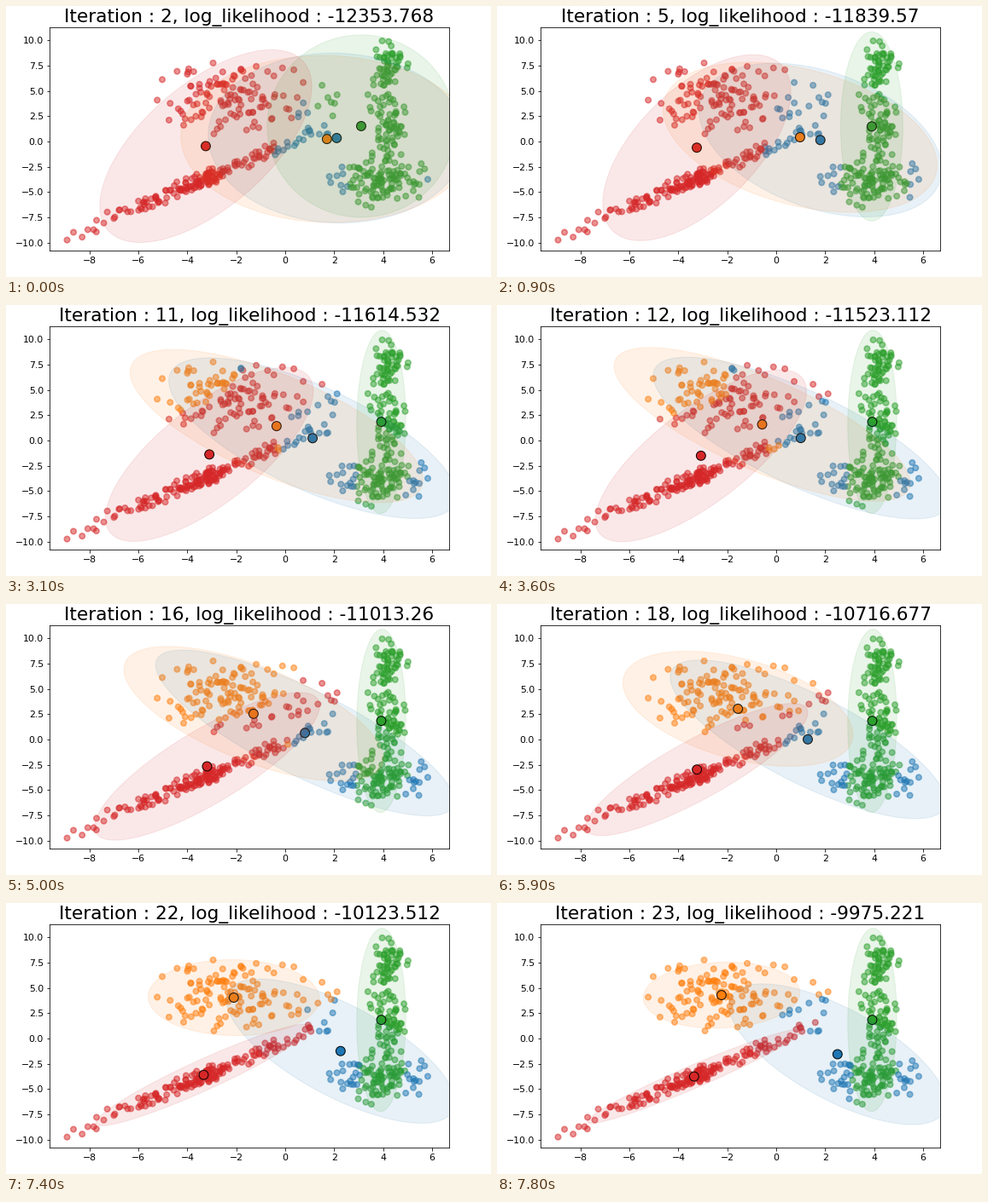
These frames come from a looping animation (568 px wide and 318 px high, 8000 ms). A matplotlib script:

```python
import numpy as np
import matplotlib.pyplot as plt
from matplotlib.animation import FuncAnimation
from matplotlib.patches import Polygon

WIDTH, HEIGHT, DPI = 568, 318, 72
LEFT, BOTTOM, AX_WIDTH, AX_HEIGHT = 51, 31, 468, 262
TICK_MS, TICKS = 100, 80
SCALE = 1.083  # text and markers relative to the default point sizes
COLORS = np.array(["tab:blue", "tab:orange", "tab:green", "tab:red"])

# Iteration 10 is skipped; some iterations open with one empty tick.
ITERATIONS = [*range(2, 10), *range(11, 24)]
BLANK_BEFORE = {5, 12, 19, 20, 23}
STARTS = np.rint(np.interp(ITERATIONS, [2, 3, 5, 9, 15, 16, 18, 20, 23],
                           [0, 1, 8.4, 23.4, 47, 50, 58.6, 66.2, 77.4]))

# Key poses by iteration: centre x, centre y, half width, half height, correlation.
BLUE = {2: (2.1, .35, 5.25, 8.4, -.03), 5: (1.8, .15, 4.96, 7.6, -.38),
        12: (1.0, .25, 6.03, 8.0, -.77), 16: (.8, .65, 6.1, 8.2, -.82),
        23: (2.5, -1.55, 4.43, 6.96, -.69)}
ORANGE = {2: (1.7, .25, 5.97, 8.26, -.03), 5: (.97, .43, 5.6, 7.42, -.37),
          12: (-.58, 1.6, 6.05, 7.6, -.76), 16: (-1.3, 2.55, 5.3, 6.66, -.66),
          23: (-2.24, 4.3, 3.2, 3.27, .08)}
GREEN = {2: (3.1, 1.53, 3.84, 9.02, 0), 5: (3.9, 1.5, 1.27, 9.36, 0),
         11: (3.92, 1.85, 1.0, 9.06, .03)}
RED = {2: (-3.25, -.45, 4.33, 9.53, .62), 5: (-3.25, -.6, 3.84, 9.2, .60),
       12: (-3.08, -1.5, 4.31, 8.5, .75), 16: (-3.2, -2.65, 4.6, 7.3, .82),
       23: (-3.36, -3.75, 4.36, 4.64, .965)}

rng = np.random.default_rng(7)


def cloud(count, center, spread, rho=0, reach=2.3):
    """Correlated normal points, cut off at `reach` standard deviations."""
    z = rng.normal(size=(count * 4, 2))
    z = z[np.hypot(*z.T) < reach][:count]
    y = rho * z[:, 0] + np.sqrt(1 - rho ** 2) * z[:, 1]
    return np.column_stack([z[:, 0], y]) * spread + center


POINTS = np.vstack([
    cloud(150, (-3.1, -3.5), (2.1, 2.15), .97, reach=2),
    cloud(10, (-7.7, -8.2), (.7, .8), .8, reach=2),
    cloud(8, (.7, .6), (.22, .4), .6),
    cloud(125, (-2.0, 4.4), (1.6, 1.7)),
    cloud(10, (1.8, 2.9), (.35, 1.5)),
    cloud(80, (4.1, 1.6), (.38, 2.6)),
    cloud(50, (4.15, 7.4), (.4, 1.3)),
    cloud(105, (3.85, -3.8), (.95, 1.2))])


def pose(path, iteration):
    return [np.interp(iteration, list(path), values) for values in zip(*path.values())]


def log_likelihood(iteration):
    value = np.interp(iteration, [2, 5, 11, 12, 16, 23],
                      [-12353.768, -11839.57, -11614.532, -11523.112, -11013.26, -9975.221])
    return round(float(value), 3)


def log_density(cx, cy, w, h, rho):
    """Log density of all points; the outline lies at two sigma."""
    dx, dy = ((POINTS - (cx, cy)) / (w / 2, h / 2)).T
    rest = 1 - rho ** 2
    distance = (dx ** 2 + dy ** 2 - 2 * rho * dx * dy) / rest
    return -distance / 2 - np.log(w * h / 4 * np.sqrt(rest))


def outline(cx, cy, w, h, rho):
    t = np.linspace(0, 2 * np.pi, 181)
    return np.column_stack([cx + w * np.cos(t), cy + h * np.cos(t - np.arccos(rho))])


plt.rcParams.update({"font.family": "DejaVu Sans", "font.size": 10 * SCALE})
fig = plt.figure(figsize=(WIDTH / DPI, HEIGHT / DPI), dpi=DPI, facecolor="white")
ax = fig.add_axes([LEFT / WIDTH, BOTTOM / HEIGHT, AX_WIDTH / WIDTH, AX_HEIGHT / HEIGHT])
ax.set(xlim=(-9.635, 6.695), ylim=(-10.785, 11.305),
       xticks=np.arange(-8, 7, 2), yticks=np.arange(-10, 10.1, 2.5))
title = ax.set_title("", fontsize=20 * SCALE)
dots = ax.scatter(*POINTS.T, s=36 * SCALE ** 2, lw=1.5 * SCALE, alpha=.5, zorder=2)
means = ax.scatter([0] * 4, [0] * 4, s=100 * SCALE ** 2, c=COLORS,
                   edgecolors="black", lw=SCALE, zorder=3)
ellipses = [ax.add_patch(Polygon([(0, 0)] * 3, color=c, alpha=.1, lw=SCALE, zorder=4))
            for c in COLORS]


def draw(tick):
    step = np.searchsorted(STARTS, tick, side="right") - 1
    iteration = ITERATIONS[step]
    ax.set_visible(not (iteration in BLANK_BEFORE and tick == STARTS[step]))
    title.set_text(f"Iteration : {iteration}, log_likelihood : {log_likelihood(iteration)}")

    poses = [pose(path, iteration) for path in (BLUE, ORANGE, GREEN, RED)]
    log_weights = [0, np.interp(iteration, [5, 23], [-.4, .4]),
                   np.interp(iteration, [2, 5], [0, 1]), .8]
    scores = [log_density(*p) + weight for p, weight in zip(poses, log_weights)]
    dots.set_color(COLORS[np.argmax(scores, axis=0)])
    means.set_offsets([p[:2] for p in poses])
    for ellipse, p in zip(ellipses, poses):
        ellipse.set_xy(outline(*p))
    return [ax]


animation = FuncAnimation(fig, draw, frames=TICKS, interval=TICK_MS,
                          repeat=True, repeat_delay=0)
plt.show()
```
